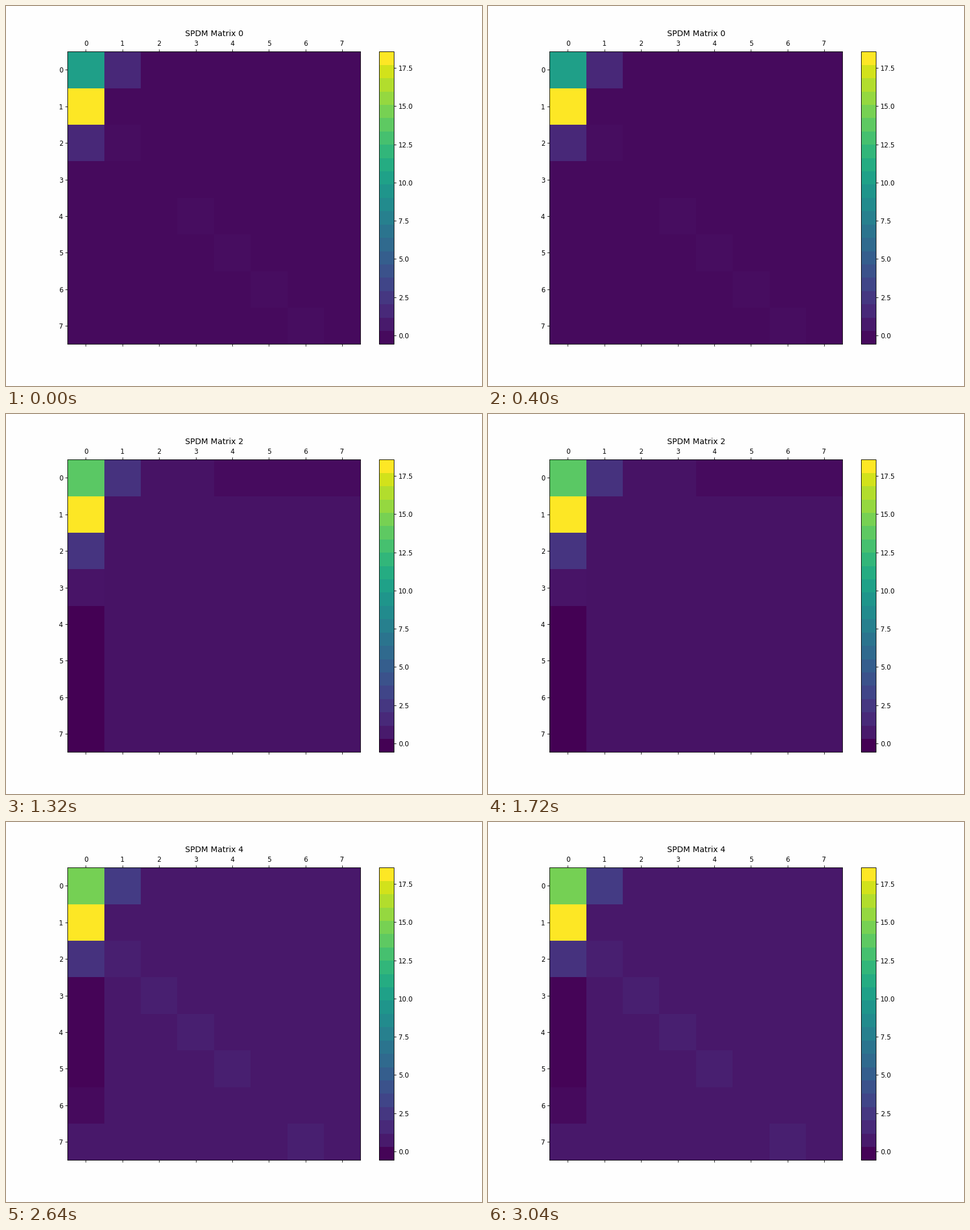
These frames come from a looping animation (837x669 px, 3300 ms). A matplotlib script:

```python
import numpy as np
import matplotlib.pyplot as plt
from matplotlib.animation import FuncAnimation
from matplotlib.cm import ScalarMappable
from matplotlib.colors import Normalize

W, H, DPI = 837, 669, 83.7
BG = "#fefefe"
N = 8
BANDS = 22
LOW, HIGH = -0.576, 18.57
STYLE = dict(cmap="viridis", norm=Normalize(0, 256))  # data are shade indices

# Shades of each matrix; column = (start, end, easing power) below row 2,
# diag = (shade, columns) on the line under the main diagonal
MATRICES = [
    dict(base=6, peaks=(143, 255, 28), row=6, column=(6, 6, 1),
         diag=(8, [1, 3, 4, 5, 6])),
    dict(base=9, peaks=(154, 255, 38), row=4, column=(13, 4, 0.05),
         diag=(12, [1, 3, 5])),
    dict(base=12, peaks=(190, 255, 38), row=7, column=(13, 0, 0.05),
         diag=(12, [])),
    dict(base=3, peaks=(255, 135, 30), row=3, column=(15, 3, 0.3),
         diag=(9, [1, 3, 4, 5])),
    dict(base=16, peaks=(202, 255, 36), row=16, column=(2, 16, 4),
         diag=(21, [1, 2, 3, 4, 6])),
]


def matrix(i):
    spec = MATRICES[i]
    cells = np.full((N, N), float(spec["base"]))
    start, end, power = spec["column"]
    cells[3:, 0] = start + (end - start) * np.linspace(0, 1, N - 3) ** power
    cells[:3, 0] = spec["peaks"]
    cells[0, 1] = 28 + 4 * i
    cells[0, 4:] = spec["row"]
    shade, cols = spec["diag"]
    for col in cols:
        cells[col + 1, col] = shade
    return np.floor(cells) + 0.5


def bar(cells):
    """Stepped scale whose end bands take the extreme shades of the cells."""
    shades = (np.arange(BANDS) + 0.5) / BANDS * 256
    shades[[0, -1]] = cells.min(), cells.max()
    return shades[:, None]


fig, ax = plt.subplots(figsize=(W / DPI, H / DPI), dpi=DPI, facecolor=BG)
fig.subplots_adjust(right=0.8998)

grid = np.arange(N + 1) - 0.5
mesh = ax.pcolormesh(grid, grid, matrix(0), **STYLE)
ax.set(aspect="equal", xlim=(-0.5, N - 0.5), ylim=(N - 0.5, -0.5),
       xticks=range(N), yticks=range(N))
ax.xaxis.tick_top()
ax.xaxis.set_ticks_position("both")
ax.tick_params(axis="x", pad=3)
title = ax.set_title("SPDM Matrix 0")

scale = ScalarMappable(Normalize(LOW, HIGH), "viridis")
cbar = fig.colorbar(scale, ax=ax)
cbar.solids.set_visible(False)
bands = cbar.ax.pcolormesh([0, 1], np.linspace(LOW, HIGH, BANDS + 1),
                           bar(matrix(0)), **STYLE)
cbar.ax.set_ylim(LOW, HIGH)


def draw(i):
    cells = matrix(i)
    mesh.set_array(cells)
    bands.set_array(bar(cells))
    title.set_text(f"SPDM Matrix {i}")
    return mesh, bands, title


anim = FuncAnimation(fig, draw, frames=len(MATRICES), interval=660,
                     repeat=True, repeat_delay=0)
plt.show()
```
